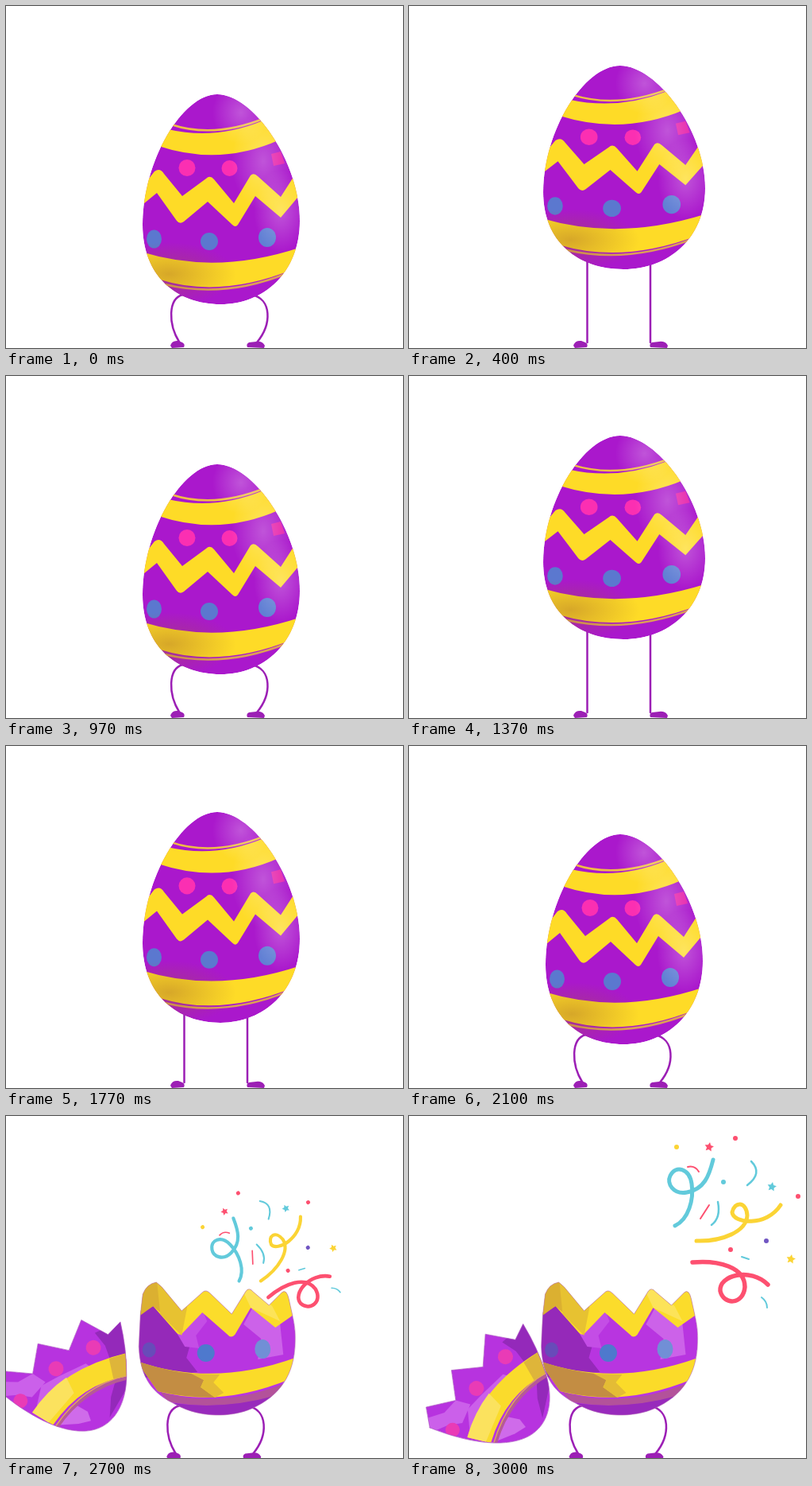
These frames come from a looping animation (500 px wide and 430 px high, 3110 ms). An HTML page:

```html
<!DOCTYPE html>
<html lang="en">
<head>
<meta charset="utf-8">
<title>Egg surprise</title>
<style>
  html, body { margin: 0; width: 100%; height: 100%; overflow: hidden; background: #fff; }
  svg { display: block; width: 500px; height: 430px; }
</style>
</head>
<body>
<svg viewBox="0 0 500 430" fill="none" stroke-linecap="round" stroke-linejoin="round">
  <defs>
    <path id="eggShape" d="M266 111C311 111 370 195 370 270C370 335 325 375 270 375C215 375 172 340 172 275C172 195 222 111 266 111Z"/>
    <path id="bowlShape" d="M170 250L173 224Q178 211 190 209L197 215L222 245L249 221Q253 218 258 223L285 249L303 220Q307 215 312 221L332 238L348 222Q354 217 357 230L361 248Q366 268 365 285C364 325 346 352 310 368C285 379 245 380 215 363C185 349 170 330 168 290Z"/>
    <path id="lidShape" d="M106 59L131 67L121 104L157 117L142 154L177 176L153 206L166 224Q130 226 98 220C65 214 38 195 38 163C39 125 75 85 106 59Z"/>
    <clipPath id="eggClip"><use href="#eggShape"/></clipPath>
    <clipPath id="bowlClip"><use href="#bowlShape"/></clipPath>
    <clipPath id="lidClip"><use href="#lidShape"/></clipPath>
    <radialGradient id="shine">
      <stop stop-color="#fff" stop-opacity=".26"/>
      <stop offset="1" stop-color="#fff" stop-opacity="0"/>
    </radialGradient>
    <radialGradient id="shade">
      <stop stop-color="#a0602a" stop-opacity=".42"/>
      <stop offset="1" stop-color="#a0602a" stop-opacity="0"/>
    </radialGradient>
  </defs>

  <g id="confetti"></g>
  <g id="legs" stroke="#9c1fb5" stroke-width="2.500">
    <path id="leftLeg"/><path id="rightLeg"/>
    <path d="M207 427Q209 420 217 421L222 423Q226 425 224 429L209 430Z" fill="#9c1fb5" stroke="none"/>
    <path d="M326 427Q323 421 315 422L306 423Q302 425 304 429L325 430Z" fill="#9c1fb5" stroke="none"/>
  </g>

  <g id="egg">
    <g clip-path="url(#eggClip)">
      <use href="#eggShape" fill="#aa18cc"/>
      <path d="M204 155Q264 169 324 144L345 168Q270 202 192 176Z" fill="#fedb27"/>
      <path d="M208 149Q262 167 326 141" stroke="#efbd45" stroke-width="2.500"/>
      <path d="M168 232L187 208Q194 203 199 211L222 239L252 217Q257 212 262 218L287 248L308 213Q312 209 317 214L346 240L364 212L372 235L346 266L314 239L292 275Q289 279 285 275L254 246L224 271Q219 275 215 270L190 235L168 253Z" fill="#fedb27"/>
      <g fill="#fb2fb2">
        <circle cx="228" cy="203.500" r="10.500"/><circle cx="281.500" cy="204" r="10"/>
        <path d="M334 186L346 183L351 198L337 201Z" fill="#e51fa9"/>
      </g>
      <g fill="#5b78cf">
        <ellipse cx="186.500" cy="293" rx="9.500" ry="11.500"/><circle cx="256" cy="296" r="11"/>
        <ellipse cx="329" cy="291" rx="11" ry="12" fill="#6180d4"/>
      </g>
      <path d="M170 309Q265 339 372 303L362 331Q270 368 194 344Z" fill="#fedb27"/>
      <path d="M200 350Q275 368 354 336" stroke="#dda055" stroke-width="2.500"/>
      <ellipse cx="205" cy="337" rx="85" ry="40" fill="url(#shade)"/>
      <ellipse cx="296" cy="134" rx="36" ry="40" fill="url(#shine)"/>
      <ellipse cx="324" cy="195" rx="40" ry="62" fill="url(#shine)"/>
      <ellipse cx="346" cy="258" rx="34" ry="52" fill="url(#shine)"/>
    </g>
  </g>

  <g id="lid">
    <g clip-path="url(#lidClip)">
      <use href="#lidShape" fill="#b733df"/>
      <path d="M100 58L118 62L114 84L121 104L108 118L92 98L98 80Z" fill="#cb60ea"/>
      <path d="M49 150L52 122L66 138L72 152L62 164L50 166Z" fill="#cf6bea"/>
      <path d="M80 102L104 112L112 136L122 172L116 178Z" fill="#cb5fea"/>
      <path d="M50 190L75 196L98 207L140 200L158 190L168 226L90 224Z" fill="#9429ba"/>
      <path d="M53 118Q99 163 97 221L126 225Q121 141 73 95Z" fill="#fadb2c"/>
      <path d="M57 113L73 95Q97 118 109 145L88 151Z" fill="#fbe25e"/>
      <path d="M97 222L97 203L123 202L126 226Z" fill="#deb53a"/>
      <path d="M49 122Q93 165 95 221" stroke="#b65a96" stroke-width="4"/>
      <path d="M51 121Q96 165 98 221" stroke="#dfa65c" stroke-width="1.500"/>
      <g fill="#e93bb6">
        <circle cx="90" cy="83" r="9"/><circle cx="122" cy="134" r="9.500"/><circle cx="140" cy="185" r="9.500"/>
      </g>
    </g>
    <use href="#lidShape" stroke="#b05cc4" stroke-width=".7"/>
  </g>

  <g id="bowl">
    <g clip-path="url(#bowlClip)">
      <use href="#bowlShape" fill="#b835e0"/>
      <path d="M165 245L187 237L220 276L232 290L228 304L242 322L165 330Z" fill="#9529b9"/>
      <path d="M213 268L249 246L254 258L240 276L244 292L226 290Z" fill="#c44de6"/>
      <path d="M300 262L312 240L346 262L350 300L318 306L322 280Z" fill="#cc62e9"/>
      <path d="M165 252V200H370V245L340 266L309 241L289 275Q284 280 280 275L248 247L223 273Q219 277 215 272L186 239Z" fill="#fbdc2b"/>
      <path d="M168 252L172 205H189L197 215L195 247L186 239Z" fill="#dbb031"/>
      <path d="M191 209L229 240L222 276L195 249Z" fill="#e7c231"/>
      <path d="M300 222L310 216L336 239L346 258L309 241Z" fill="#fce359"/>
      <ellipse cx="181" cy="294" rx="8.500" ry="9.500" fill="#684bb9"/>
      <circle cx="252.500" cy="298" r="11" fill="#4e79cd"/>
      <ellipse cx="324" cy="293" rx="10" ry="12" fill="#718fd6"/>
      <path d="M195 347Q270 369 352 336L340 352Q270 372 205 359Z" fill="#b3529a"/>
      <path d="M165 308Q262 342 368 303L358 331Q270 367 192 346Z" fill="#fbdb29"/>
      <path d="M165 308Q205 321 236 324L250 332L246 341L264 354Q225 354 192 346Z" fill="#c38d43"/>
      <path d="M234 324L270 325L262 335L275 348L264 354L246 341L250 332Z" fill="#e4bc35"/>
      <path d="M212 361Q275 370 342 351L310 385H225Z" fill="#982abc"/>
    </g>
    <use href="#bowlShape" stroke="#b673b8" stroke-width=".6"/>
  </g>
</svg>
<script>
const LOOP = 3110, CRACK = 2130, CROUCH = 24;
const cues = [0, 100, 170, 270, 330, 400, 500, 570, 670, 730, 800, 870, 970, 1070, 1130, 1200,
  1300, 1370, 1470, 1530, 1630, 1700, 1770, 1870, 1930, 2030, 2130, 2200];
for (let t = 2300; t <= 3000; t += 100) cues.push(t);

// Bounce cycle: egg width, top, bottom
const bounce = [[199, 111, 375], [211, 138, 387], [221, 154, 394], [211, 130, 381], [199, 83, 348], [205, 75, 331]];

// Time, x, y, angle
const lidKeys = [[2030, 280, 210, 111], [2130, 279, 208, 109], [2200, 272, 192, 98], [2300, 200, 138, 58],
  [2400, 122, 133, 0], [2500, 84, 170, -42], [2700, 62, 318, -100], [2800, 62, 342, -112],
  [2900, 68, 344, -124], [3000, 84, 343, -118]];

const $ = id => document.getElementById(id);
const set = (id, name, value) => $(id).setAttribute(name, value);
const show = (id, on) => set(id, 'display', on ? 'inline' : 'none');
const mix = (a, b, k) => a + (b - a) * k;

const red = '#fd5070', teal = '#62cadb', yellow = '#fbd435', violet = '#7156c2';

function star(x, y, color) {
  const points = Array.from({ length: 10 }, (_, i) => {
    const r = i % 2 ? 3 : 6, a = i * Math.PI / 5 - 1.4;
    return `${x + r * Math.cos(a)},${y + r * Math.sin(a)}`;
  });
  return `<polygon points="${points.join(' ')}" fill="${color}"/>`;
}
const dot = (x, y, color) => `<circle cx="${x}" cy="${y}" r="3" fill="${color}"/>`;
const ribbon = (d, color, width) => `<path d="${d}" stroke="${color}" stroke-width="${width}"/>`;

$('confetti').innerHTML = [
  ribbon('M383 55C378 75 372 92 350 96C333 99 324 85 329 75C336 61 353 66 356 85C359 105 352 130 335 138', teal, 5),
  ribbon('M362 157C395 158 425 145 426 125C425 107 410 107 407 121C408 135 450 140 468 112', yellow, 5),
  ribbon('M357 184C390 181 423 190 423 215C421 238 396 238 392 220C390 200 430 190 452 212', red, 5.5),
  ribbon('M351 64Q360 62 365 70', red, 2),
  ribbon('M431 57Q446 72 426 87', teal, 2.5),
  ribbon('M389 108Q393 128 381 137', teal, 2.5),
  ribbon('M378 112L367 129', red, 2),
  ribbon('M419 177L428 180', teal, 2),
  ribbon('M444 228Q451 233 451 241', teal, 2),
  dot(411, 28, red), dot(337, 39, yellow), dot(396, 83, teal),
  dot(490, 101, red), dot(450, 157, violet), dot(405, 168, red),
  star(378, 39, red), star(457, 89, teal), star(481, 180, yellow)
].join('');

function track(keys, t) {
  const i = Math.max(1, keys.findIndex(key => key[0] >= t));
  const a = keys[i - 1], b = keys[i], k = (t - a[0]) / (b[0] - a[0]);
  return a.slice(1).map((v, j) => mix(v, b[j + 1], k));
}

function drawLegs(bottom, x, y) {
  const bend = Math.max(0, (bottom - 348) / 27), hip = bottom - 12;
  const leg = (x, start, bow, end) => `M${x + start * bend} ${hip}C${x + bow * bend} ${hip + 5 * bend} ` +
    `${x + bow * bend} 400 ${x + end * bend} 423`;
  set('leftLeg', 'd', leg(224.5, -2, -20.5, -6));
  set('rightLeg', 'd', leg(304, 5, 31, 12));
  set('legs', 'transform', `translate(${x} ${y})`);
}

function drawBounce(step) {
  const [width, top, bottom] = bounce[step % bounce.length];
  set('egg', 'transform', `translate(270.5 ${bottom}) scale(${width / 199} ${(bottom - top) / 264}) translate(-270.5 -375)`);
  drawLegs(bottom, 0, 0);
}

function drawSurprise(t) {
  const drift = -1.5 * Math.max(0, t - 2400) / 600;
  set('bowl', 'transform', `translate(${drift} 0)`);
  drawLegs(375, drift - 4, 1.5);

  const [x, y, angle] = track(lidKeys, t);
  set('lid', 'transform', `translate(${x} ${y}) rotate(${angle}) translate(-122 -133)`);

  const k = Math.max(0, (t - 2400) / 600) ** 1.35;
  const [cx, cy, turn, size] = t < 2400 ? [283, 238, -80, .3]
    : [mix(297, 405, k), mix(196, 135, k), mix(-58, 0, k), mix(.715, 1, k)];
  set('confetti', 'transform', `translate(${cx} ${cy}) rotate(${turn}) scale(${size}) translate(-405 -135)`);
}

function render(time) {
  const step = cues.findLastIndex(cue => cue <= time), t = cues[step];
  const open = t >= CRACK;
  show('egg', !open);
  show('lid', open);
  show('bowl', open);
  show('confetti', t >= 2300);
  if (open) drawSurprise(t); else drawBounce(Math.min(step, CROUCH));
}

const start = performance.now();
function tick() {
  render((performance.now() - start) % LOOP);
  requestAnimationFrame(tick);
}
tick();
</script>
</body>
</html>
```
